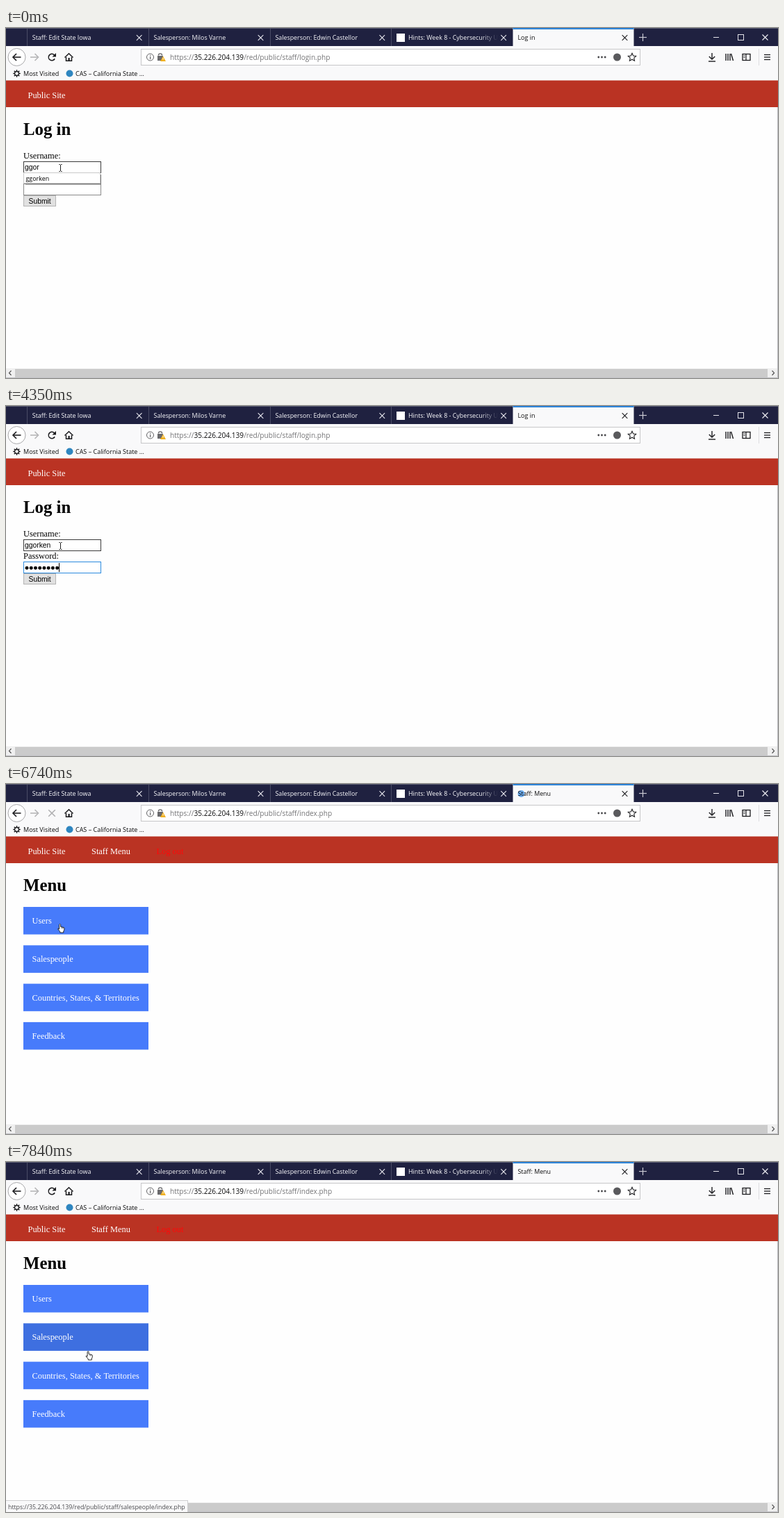
Animation of 1111 by 504 pixels, one loop 7.99 s. Source, as an HTML page with a canvas:

```html
<!DOCTYPE html>
<html lang="en">
<head>
<meta charset="utf-8">
<title>Log in</title>
<style>
  html, body { margin: 0; width: 100%; height: 100%; overflow: hidden; background: #fefefe; }
  canvas { display: block; }
</style>
</head>
<body>
<canvas id="stage" width="1111" height="504"></canvas>
<script>
const ctx = document.getElementById('stage').getContext('2d');
const LOOP = 7990;
const UI = '"Open Sans", "Noto Sans", sans-serif';
const SERIF = '"Liberation Serif", "Noto Serif", serif';
const FORM = '"Liberation Sans", sans-serif';
const INK = '#1c1c1f';
const HOST = '35.226.204.139';
const BASE = '/red/public/staff/';
const USER = 'ggorken';

// Moments at which each password dot appears, and the caret's visible spans.
const DOTS = [2030, 2310, 2460, 2740, 3550, 3950, 4100, 4350, 5180, 5460, 5460, 5730];
const CARET = [[1510, 2990], [3950, 4620], [5180, 5730], [6230, 6740]];
const FOCUS = 980, SEND = 6230, LOADED = 6740, HOVER = 6890, READY = 7420;

const rect = (x, y, w, h, color) => { ctx.fillStyle = color; ctx.fillRect(x, y, w, h); };

const frame = (x, y, w, h, color, fill) => {
  if (fill) rect(x, y, w, h, fill);
  ctx.strokeStyle = color;
  ctx.lineWidth = 1;
  ctx.strokeRect(x + 0.5, y + 0.5, w - 1, h - 1);
};

function text(str, x, y, size, family = UI, color = '#000', weight = '') {
  ctx.font = `${weight} ${size}px ${family}`;
  ctx.fillStyle = color;
  ctx.fillText(str, x, y);
  return x + ctx.measureText(str).width;
}

// Open polyline given as flat coordinates.
function line(color, width, ...p) {
  ctx.strokeStyle = color;
  ctx.lineWidth = width;
  ctx.beginPath();
  for (let i = 0; i < p.length; i += 2) ctx.lineTo(p[i], p[i + 1]);
  ctx.stroke();
}

function disc(x, y, r, color) {
  ctx.fillStyle = color;
  ctx.beginPath();
  ctx.arc(x, y, r, 0, 7);
  ctx.fill();
}

function ring(x, y, r, color, width = 1, from = 0, to = Math.PI * 2) {
  ctx.strokeStyle = color;
  ctx.lineWidth = width;
  ctx.beginPath();
  ctx.arc(x, y, r, from, to);
  ctx.stroke();
}

function cross(x, y, r, color, width) {
  line(color, width, x - r, y - r, x + r, y + r);
  line(color, width, x + r, y - r, x - r, y + r);
}

function arrow(x, y, dir, color) {
  line(color, 1.6, x - 6 * dir, y, x + 5 * dir, y);
  line(color, 1.6, x + 0.5 * dir, y - 5, x + 5.5 * dir, y, x + 0.5 * dir, y + 5);
}

function star(x, y, r) {
  ctx.beginPath();
  for (let i = 0; i < 10; i++) {
    const a = i * Math.PI / 5 - Math.PI / 2, q = i % 2 ? r * 0.48 : r;
    ctx.lineTo(x + q * Math.cos(a), y + q * Math.sin(a));
  }
  ctx.closePath();
  ctx.strokeStyle = INK;
  ctx.lineWidth = 1.1;
  ctx.stroke();
}

function drawTabs(t) {
  rect(0, 0, 1111, 26, '#1f2140');
  rect(0, 0, 1111, 1, '#5c5e72');
  const tabs = ['Staff: Edit State Iowa', 'Salesperson: Milos Varne',
    'Salesperson: Edwin Castellor', 'Hints: Week 8 - Cybersecurity U'];
  tabs.forEach((name, i) => {
    const x = 30.5 + 174.8 * i;
    line('#4a4c66', 1, Math.floor(x) + 0.5, 1, Math.floor(x) + 0.5, 26);
    let color = '#fafafc';
    if (i === 3) {
      color = ctx.createLinearGradient(684, 0, 708, 0);
      color.addColorStop(0, '#fafafc');
      color.addColorStop(1, '#1f2140');
      rect(562, 8, 12, 12, '#fff');
    }
    text(name, i === 3 ? 579 : x + 7.3, 17, 8.9, UI, color);
    cross(x + 161.2, 14, 3.8, '#e8e8ee', 1.1);
  });

  rect(729.5, 0, 174, 26, '#f9f9fa');
  rect(729.5, 0, 174, 2, '#2d84d8');
  drawBurst(t);
  const busy = t >= SEND && t < LOADED;
  if (busy) {
    const k = [6230, 6350, 6500, 6620].filter(s => t >= s).length;
    disc(737 + [0, 3, 7, 10][k - 1], 14, 1.7, '#33475f');
  }
  text(t < LOADED ? 'Log in' : 'Staff: Menu', busy ? 754 : 736.5, 17, 8.9, UI, '#0c0c0d');
  cross(890.5, 14, 3.8, INK, 1.1);

  line('#c8c8d2', 1.2, 911, 13.5, 922, 13.5);
  line('#c8c8d2', 1.2, 916.5, 8, 916.5, 19);
  line('#e4e4ea', 1, 1018, 13.5, 1026, 13.5);
  frame(1053, 9, 9, 9, '#e4e4ea');
  cross(1092.5, 13.5, 4, '#f0f0f4', 1.1);
}

// Ripple spreading over the tab once the page has arrived.
function drawBurst(t) {
  if (t < LOADED || t >= 7170) return;
  const [r, alpha] = t < HOVER ? [5, 0.75] : t < 7050 ? [96, 0.3] : [156, 0.12];
  ctx.save();
  ctx.beginPath();
  ctx.rect(731, 2, 172, 24);
  ctx.clip();
  disc(741.5, 14, r, `rgba(60,145,235,${alpha})`);
  ctx.restore();
}

function drawToolbar(t) {
  rect(0, 26, 1111, 50, '#f9f9fa');
  disc(15.5, 42, 12.5, '#fff');
  ring(15.5, 42, 12.5, '#a8a8aa');
  arrow(15.5, 42, -1, INK);
  arrow(41, 42, 1, '#b5b5b7');

  if (t >= SEND && t < READY) {
    cross(66, 42, 4.8, t < LOADED ? INK : '#b0b0b2', 1.6);
  } else {
    ring(66, 42, 4.7, INK, 1.6, 0.5, 5.6);
    ctx.fillStyle = INK;
    ctx.beginPath();
    ctx.moveTo(72, 36); ctx.lineTo(72, 41.5); ctx.lineTo(66.5, 41.5);
    ctx.fill();
  }

  line(INK, 1.5, 84.5, 42.5, 90.5, 36.7, 96.5, 42.5);
  line(INK, 1.5, 86.5, 42, 86.5, 47.2, 94.5, 47.2, 94.5, 42);
  rect(89.5, 43, 2.2, 4, INK);

  frame(194, 30, 719, 24, '#c6c6c8', '#fff');
  ring(207.5, 42, 5, '#606063');
  rect(207, 41, 1.2, 4, '#606063');
  rect(207, 38.8, 1.2, 1.2, '#606063');
  ring(222, 39.5, 2.6, '#6a6a6d', 1.4, Math.PI, 0);
  rect(218, 40, 8, 7, '#6a6a6d');
  ctx.fillStyle = '#f0b020';
  ctx.beginPath();
  ctx.moveTo(226, 40.5); ctx.lineTo(230, 48); ctx.lineTo(222, 48);
  ctx.fill();
  rect(225.6, 43, 0.9, 2.6, '#fff');

  const page = t < LOADED ? 'login.php' : 'index.php';
  let x = text('https://', 236, 46, 10.12, UI, '#747476');
  x = text(HOST, x, 46, 10.12, UI, '#0c0c0d');
  text(BASE + page, x, 46, 10.12, UI, '#747476');

  for (const dx of [0, 4.7, 9.4]) disc(852.8 + dx, 42, 1.4, '#48484b');
  disc(879.5, 42, 5.5, '#5a5a5d');
  star(901, 42.3, 6);

  line(INK, 1.4, 1016, 36, 1016, 45);
  line(INK, 1.4, 1011.8, 41, 1016, 45, 1020.2, 41);
  line(INK, 1.4, 1011, 48, 1021, 48);
  for (const lx of [1036, 1039, 1042]) line(INK, 1.4, lx, 37, lx, 47);
  line(INK, 1.4, 1043.5, 37, 1046.5, 47);
  ctx.strokeStyle = INK;
  ctx.lineWidth = 1.3;
  ctx.strokeRect(1060, 37.5, 11, 9);
  line(INK, 1.2, 1065, 37, 1065, 47);
  rect(1061.5, 39.5, 2, 1, INK);
  rect(1061.5, 41.8, 2, 1, INK);
  line('#dedee0', 1, 1083.5, 30, 1083.5, 54);
  for (const my of [38.5, 42, 45.5]) line(INK, 1.3, 1091, my, 1100, my);

  for (let i = 0; i < 8; i++) {
    const a = i * Math.PI / 4, c = Math.cos(a), s = Math.sin(a);
    line(INK, 1.4, 15.5 + 3 * c, 65.5 + 3 * s, 15.5 + 5.3 * c, 65.5 + 5.3 * s);
  }
  ring(15.5, 65.5, 3, INK, 1.3);
  text('Most Visited', 25, 69, 9, UI, '#0c0c0d');
  disc(91.5, 65.5, 5, '#2f86c0');
  text('CAS – California State ...', 100, 69, 9, UI, '#0c0c0d');
}

function drawNav(items) {
  rect(0, 75.5, 1111, 38.5, '#ba3323');
  items.forEach(([label, x, color]) => text(label, x, 101, 12.4, SERIF, color));
}

function drawLogin(t) {
  drawNav([['Public Site', 31.5, '#fff']]);
  text('Log in', 25, 154, 24.8, SERIF, '#000', 'bold');
  text('Username:', 25, 188, 12.4, SERIF);
  frame(25, 192, 112, 17, '#3a3a3a', '#fff');
  const typed = t < 280 ? 4 : t < 430 ? 6 : 7;
  text(USER.slice(0, typed), 27, 204, 10.33, FORM);

  const focused = t >= FOCUS;
  if (focused) text('Password:', 25, 220, 12.4, SERIF);
  frame(25, 224, 112, 17, focused ? '#2a8ade' : '#8a8a8a', '#fff');

  const count = DOTS.filter(d => t >= d).length;
  for (let i = 0; i < count; i++) disc(30 + 6.23 * i, 233.3, 2.45, '#000');
  if (CARET.some(([on, off]) => t >= on && t < off)) {
    rect(Math.floor(27 + 6.24 * count), 226, 1, 13, '#000');
  }

  if (!focused) {
    rect(28, 211, 109, 14.5, '#777');
    frame(25, 208, 111, 16, '#c9c9c9', '#fff');
    text(USER, 28.5, 220, 8.9, UI, '#000');
  }
  frame(25, 241, 47, 16, '#b4b4b4', '#e1e1e1');
  text('Submit', 32.5, 253, 10.33, FORM);
}

function drawMenu(t) {
  drawNav([['Public Site', 31.5, '#fff'], ['Staff Menu', 123, '#fff'], ['Log out', 216.5, '#ff0808']]);
  text('Menu', 25, 154, 24.8, SERIF, '#000', 'bold');
  const active = t < HOVER ? -1 : t < 7840 ? 0 : 1;
  ['Users', 'Salespeople', 'Countries, States, & Territories', 'Feedback'].forEach((label, i) => {
    const y = 177 + 55.3 * i;
    rect(25, y, 180, 39.6, i === active ? '#3e6fe0' : '#477bfb');
    text(label, 37.5, Math.round(y + 24), 12.4, SERIF, '#fff');
  });
}

function drawScrollbar() {
  rect(0, 490, 1111, 14, '#f0f0f0');
  rect(13, 491, 1083, 12, '#cbcbcb');
  line('#505050', 1.2, 7.5, 493.5, 4.5, 496.7, 7.5, 500);
  line('#505050', 1.2, 1102.5, 493.5, 1105.5, 496.7, 1102.5, 500);
  rect(1110, 114, 1, 390, '#b9b9bd');
  rect(0, 503, 1111, 1, '#c4c4c8');
}

function drawStatus(t) {
  let label, width;
  if (t >= SEND && t < LOADED) [label, width] = [`Waiting for ${HOST}...`, 205];
  else if (t >= 7840) [label, width] = [`https://${HOST}${BASE}salespeople/index.php`, 262];
  else if (t >= HOVER) [label, width] = [`https://${HOST}${BASE}users/index.php`, 234];
  else return;
  frame(-1, 487, width + 1, 18, '#cfcfd1', '#f9f9fa');
  text(label, 3, 500, 8.8, UI, '#4a4a4d');
}

function drawBeam(x, y) {
  line('#222', 1, x, y + 1, x, y + 10);
  for (const by of [y + 0.5, y + 10.5]) {
    line('#222', 1, x - 2.2, by, x - 0.6, by);
    line('#222', 1, x + 0.6, by, x + 2.2, by);
  }
}

function drawHand(x, y) {
  ctx.save();
  ctx.translate(x, y);
  ctx.beginPath();
  ctx.moveTo(2.6, 8);
  ctx.lineTo(2.6, 1.4);
  ctx.quadraticCurveTo(3.6, -0.2, 4.6, 1.4);
  ctx.lineTo(4.6, 4.6);
  ctx.lineTo(9, 5.5);
  ctx.quadraticCurveTo(10.2, 6, 10, 7.4);
  ctx.quadraticCurveTo(9.9, 9.6, 8.8, 11);
  ctx.lineTo(8.8, 13);
  ctx.lineTo(3.8, 13);
  ctx.lineTo(3.6, 11.4);
  ctx.lineTo(0.6, 7.8);
  ctx.quadraticCurveTo(0.6, 6.3, 2.6, 8);
  ctx.fillStyle = '#fff';
  ctx.strokeStyle = '#111';
  ctx.lineWidth = 0.9;
  ctx.fill();
  ctx.stroke();
  line('#111', 0.6, 6.4, 5.2, 6.4, 7.4);
  line('#111', 0.6, 8.2, 5.6, 8.2, 7.6);
  ctx.restore();
}

function draw(t) {
  rect(0, 0, 1111, 504, '#fefefe');
  drawTabs(t);
  drawToolbar(t);
  if (t < LOADED) drawLogin(t);
  else drawMenu(t);
  drawScrollbar();
  drawStatus(t);
  if (t < LOADED) drawBeam(78.5, 196);
  else if (t < 7690) drawHand(74, 201);
  else if (t < 7840) drawHand(75.5, 211);
  else drawHand(114.5, 272);
}

const start = performance.now();
function tick() {
  draw((performance.now() - start) % LOOP);
  requestAnimationFrame(tick);
}
tick();
</script>
</body>
</html>
```
